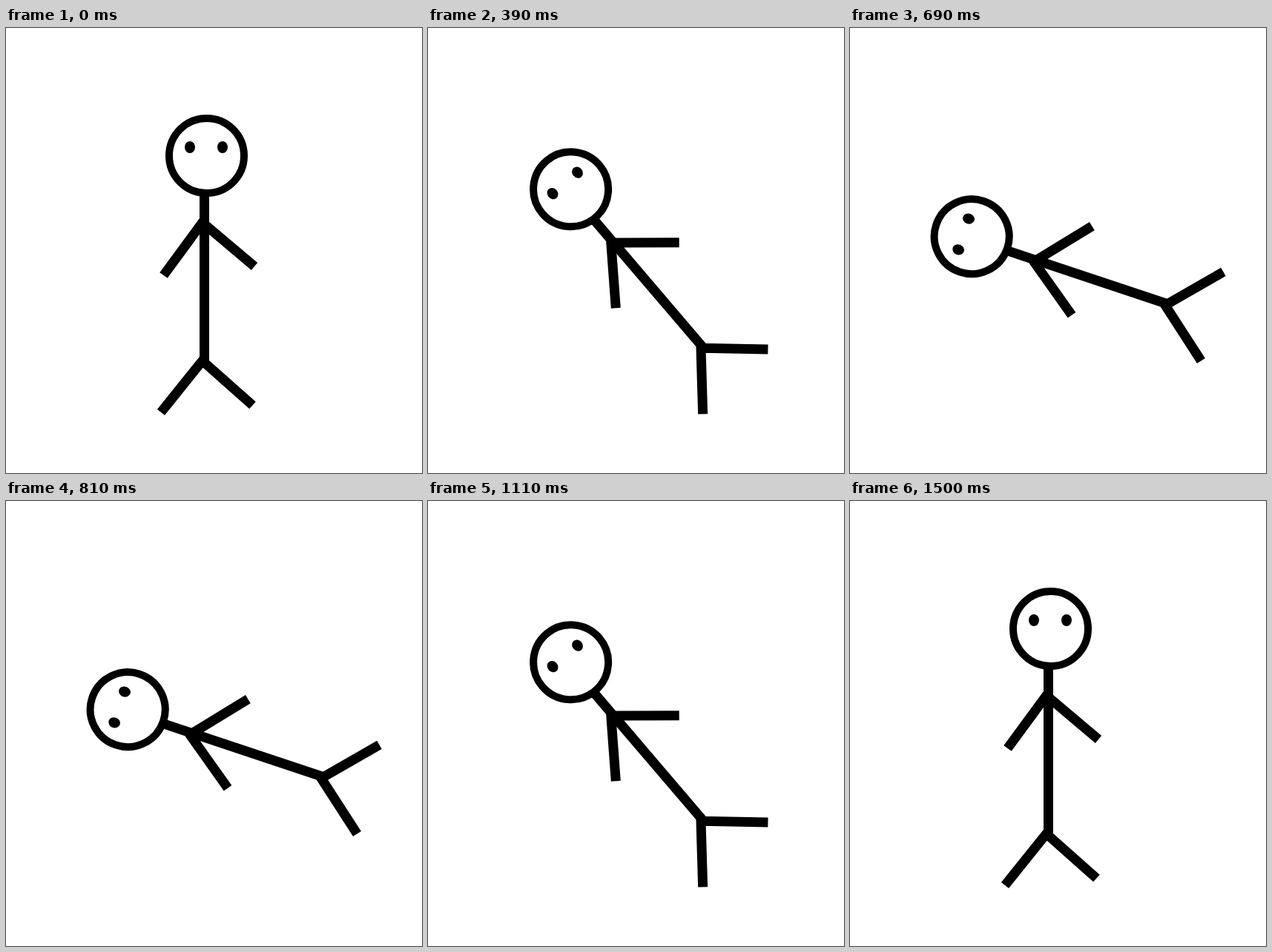
Write an HTML page that moves like this. It is 561x601 px and loops after 1530 ms.

```html
<!DOCTYPE html>
<html lang="en">
<head>
<meta charset="utf-8">
<title>Tipping stick figure</title>
<style>
html, body { margin: 0; width: 100%; height: 100%; overflow: hidden; background: #fff; }
svg { display: block; }
</style>
</head>
<body>
<svg width="561" height="601" viewBox="0 0 561 601">
  <g id="figure">
    <path fill="none" stroke="#000" stroke-width="13"
      d="M267.5 223V451 M266 261L212.5 334 M267 264.5L335 322 M266 448L209 519 M266 450.5L332.5 509.5"/>
    <circle cx="270.5" cy="172.5" r="50.5" fill="#fff" stroke="#000" stroke-width="10"/>
    <ellipse cx="248" cy="161" rx="7" ry="8"/>
    <ellipse cx="292" cy="161" rx="7" ry="8"/>
  </g>
</svg>
<script>
const LOOP = 1530, STEP = 30, TURN = 3.112, PEAK = 25;
const figure = document.getElementById('figure');

// Constant-speed swing to the left and back, in 30 ms steps.
function draw() {
  const step = Math.floor(performance.now() % LOOP / STEP);
  const angle = -TURN * (PEAK - Math.abs(step - PEAK));
  figure.setAttribute('transform', `rotate(${angle} 293 300.8)`);
  requestAnimationFrame(draw);
}
draw();
</script>
</body>
</html>
```
